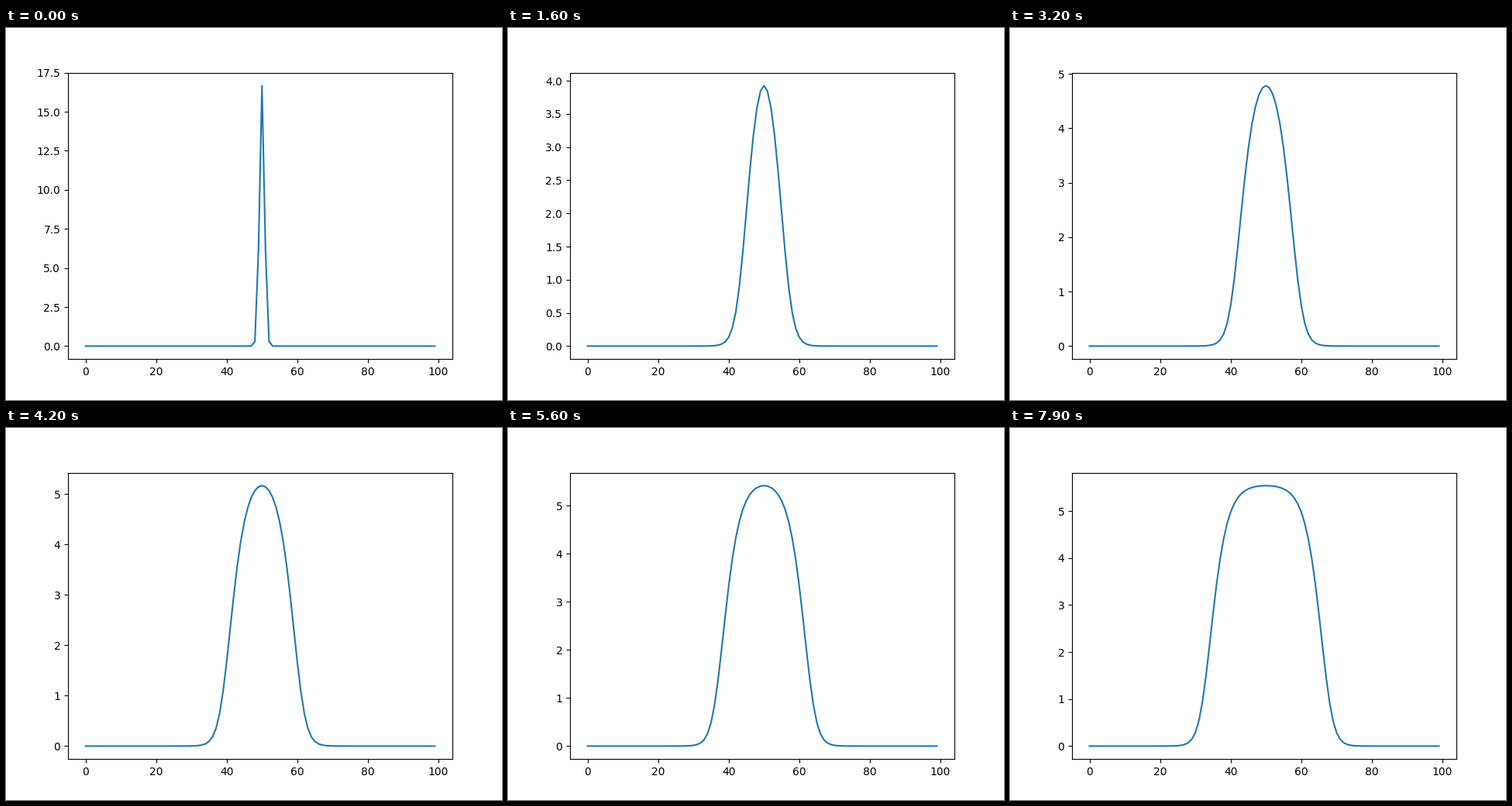
A matplotlib script for the animation above (8 s loop, 640 by 480 pixels).

```python
"""A sharp pulse diffuses, then spreads as a growing plateau (Allee growth).

u_t = D u_xx + r u (1 - u/K) (u - A) / (u + B)
"""
import numpy as np
import matplotlib.pyplot as plt
from matplotlib.animation import FuncAnimation

FRAMES, INTERVAL = 80, 100
SUBSTEPS = 20

D = 0.75    # diffusion per frame
r = 0.2646  # growth rate per frame
K = 5.57    # plateau height
A = 1.18    # growth threshold
B = 1.05    # softness of the threshold

x = np.arange(100)


def growth(u):
    return r * u * (1 - u / K) * (u - A) / (u + B)


def spread(u):
    padded = np.pad(u, 1, mode="edge")
    return D * np.diff(padded, 2)


def simulate():
    u = 50 / 3 * np.exp(-(x - 50.0) ** 2)
    profiles = [u]
    for _ in range(FRAMES - 1):
        for _ in range(SUBSTEPS):
            u = u + (spread(u) + growth(u)) / SUBSTEPS
        profiles.append(u)
    return profiles


profiles = simulate()

fig, ax = plt.subplots(figsize=(6.4, 4.8), dpi=100)
line, = ax.plot(x, profiles[0])


def update(i):
    line.set_ydata(profiles[i])
    ax.relim()
    ax.autoscale_view()
    return line,


anim = FuncAnimation(fig, update, frames=FRAMES, interval=INTERVAL,
                     repeat=True, repeat_delay=0, blit=False)
plt.show()
```
